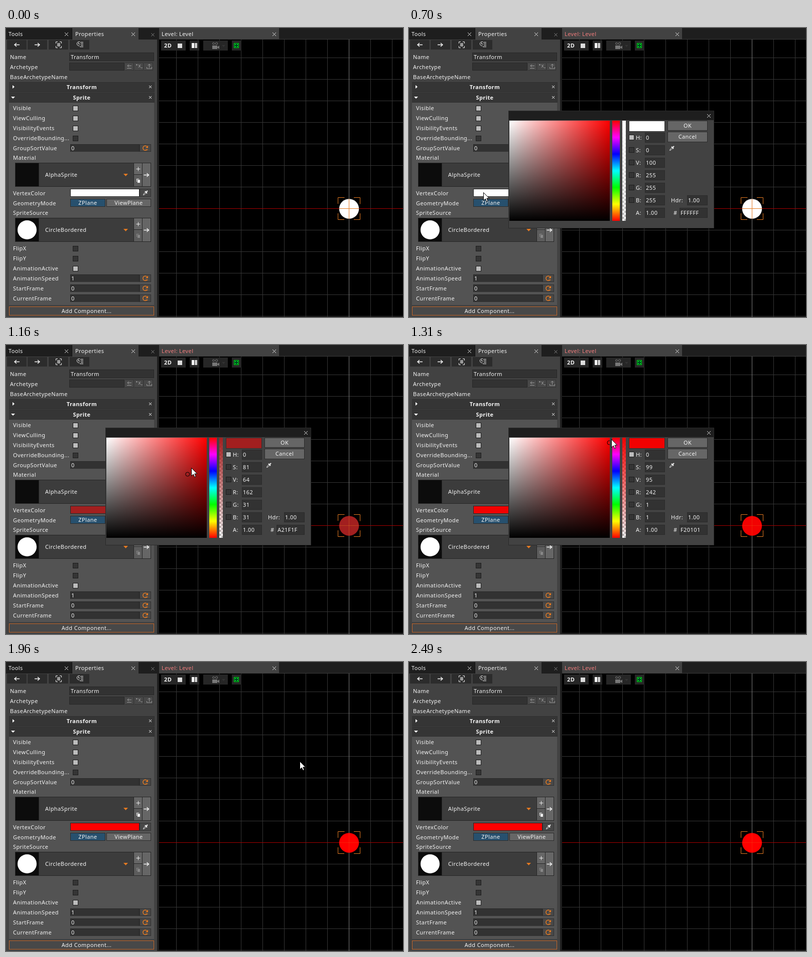
An HTML page that plays this animation: 791x577 px, repeating every 3.15 s.

```html
<!DOCTYPE html>
<html lang="en">
<head>
<meta charset="utf-8">
<title>Vertex color</title>
<style>
  html, body { margin: 0; width: 100%; height: 100%; overflow: hidden; background: #000; }
  svg { display: block; width: 791px; height: 577px; --picked: #fff; }
  rect { shape-rendering: crispEdges; }
  text { font: 11px "Noto Sans", sans-serif; letter-spacing: .4px; fill: #f4f4f4; white-space: pre; }
  .bold { font-weight: 700; }
  .mid { text-anchor: middle; }
  .line { fill: none; stroke: #eee; }
  .picked { fill: var(--picked); }
</style>
</head>
<body>
<svg id="stage" viewBox="0 0 791 577"></svg>
<script>
const LOOP = 3150, STEP = 30;
const DIALOG_OPEN = 630, PICK_START = 1070, PICK_END = 1430, DIALOG_CLOSE = 1960;
const ORANGE = '#e57a22', BUTTON = '#666', FIELD = '#323232', PANEL = '#424242', DARK = '#1e1e1e';

// Pointer keys: time, x, y
const pointerPath = [
  [100, 556, 30], [190, 428, 128], [280, 252, 256], [370, 133, 333], [430, 115, 340],
  [520, 145, 329], [560, 148, 328], [710, 148, 328], [800, 196, 318], [920, 302, 297],
  [1010, 339, 290], [1070, 347, 280], [1190, 380, 228], [1280, 400, 191], [1310, 405, 187],
  [1400, 412, 170], [1490, 421, 169], [1610, 473, 175], [1670, 556, 194], [1730, 585, 198],
  [2150, 585, 198], [2250, 618, 268], [2370, 690, 430], [2460, 743, 557]
];

// Shape helpers
const box = (x, y, w, h, fill, extra = '') =>
  `<rect x="${x}" y="${y}" width="${w}" height="${h}" fill="${fill}" ${extra}/>`;
const label = (x, y, str, cls = '', extra = '') =>
  `<text x="${x}" y="${y}" class="${cls}" ${extra}>${str}</text>`;
const shape = (d, fill) => `<path d="${d}" fill="${fill}"/>`;
const line = (d, color = '#eee', width = 1) =>
  `<path class="line" d="${d}" style="stroke:${color};stroke-width:${width}"/>`;
const cross = (x, y, r, color = '#ddd') =>
  line(`M${x - r} ${y - r}l${2 * r} ${2 * r}m0 ${-2 * r}l${-2 * r} ${2 * r}`, color);
const check = (x, y, on) =>
  box(x, y, 11, 11, '#1c1c1c') + box(x + 1, y + 1, 9, 9, on ? '#bcbcbc' : '#353535');
const button = (x, y, w, h, str, fill = BUTTON) =>
  box(x, y, w, h, '#2c2c2c') + box(x + 1, y + 1, w - 2, h - 2, fill) +
  label(x + w / 2, y + h / 2 + 3.5, str, 'mid');
const dropper = (x, y) =>
  line(`M${x - 4.5} ${y + 4.5}l1-2.5 4-4 1.5 1.5-4 4z`, '#e8e8e8') +
  line(`M${x - 1} ${y - 3}l4 4M${x + 1} ${y - 1}l3-3`, '#f4f4f4', 2);
const reset = (x, y) =>
  line(`M${x + 3.5} ${y - 3}A4.5 4.5 0 1 0 ${x + 4} ${y + 3}`, ORANGE, 1.5) +
  shape(`M${x + 6} ${y - 5}v5h-5z`, ORANGE) + line(`M${x + 1} ${y + 3.5}h5`, ORANGE);
const arrow = (x, y, dir) =>
  line(`M${x - 5 * dir} ${y}h${10 * dir}m${-4 * dir}-3.5l${4 * dir} 3.5l${-4 * dir} 3.5`, '#f4f4f4', 1.4);

function numberRow(y, name, value) {
  return label(14, y + 4, name) + box(128, y - 8, 138, 15, '#282828') +
    box(129, y - 7, 136, 14, FIELD) + label(130, y + 4, value) +
    box(266, y - 8, 23, 15, '#303030') + box(267, y - 7, 21, 13, '#484848') + reset(277, y - .5);
}

function resourceRow(y, name, copyColor) {
  return box(18, y, 271, 48, '#262626') + box(66, y + 1, 188, 46, '#3c3c3c') +
    box(19, y + 1, 46, 46, '#0c0c0c') + label(78, y + 28, name) +
    shape(`M234 ${y + 22}h9l-4.5 5z`, ORANGE) +
    box(255, y + 1, 16, 22, BUTTON) + box(255, y + 24, 16, 23, '#5c5c5c') +
    box(272, y + 1, 16, 46, BUTTON) + arrow(279.5, y + 24.5, 1) +
    line(`M259.5 ${y + 12.5}h8m-4-4v8`, '#eee') +
    box(260, y + 32, 5, 6, copyColor) + box(262, y + 34, 5, 6, copyColor) +
    line(`M261.5 ${y + 39}v-5.5h4`, '#555');
}

function header(y, name, triangle) {
  return box(6, y, 290, 20, '#303030') + box(6, y + 1, 289, 18, '#353535') +
    shape(triangle, '#fff') + label(151, y + 14, name, 'bold mid') + cross(287.5, y + 9.5, 2.5, '#fff');
}

function topBar() {
  return box(0, 0, 791, 23, DARK) + box(132, 0, 132, 23, PANEL) + box(305, 0, 239, 23, PANEL) +
    box(131, 0, 1, 23, '#111') + box(305, 22, 486, 1, '#3c3c3c') +
    label(5, 16, 'Tools') + label(138, 16, 'Properties') +
    label(310, 16, 'Level: Level', '', 'id="levelTab"') +
    cross(120.5, 12.5, 3.5) + cross(253.5, 12.5, 3.5) + cross(292.5, 13.5, 3, '#888') + cross(534.5, 12.5, 3.5);
}

function toolButtons() {
  return [2, 43, 85, 127].map(x => box(x, 24, 39, 19, '#2c2c2c')).join('') +
    arrow(22, 33.5, -1) + arrow(62, 33.5, 1) +
    line('M99.5 31v-3.5h3.500M107 27.5h3.500v3.500M110.5 36v3.500h-3.500M103 39.5h-3.500v-3.500') +
    box(102, 30, 6, 7, '#999') +
    line('M147 27.5h-2.5a4 4 0 1 0 2 8M144.5 29v3h3') +
    line('M148 28.500h6M149 31.500h5M149 34.500h5M147 37.500h7');
}

function properties() {
  const checks = [[160, 'Visible', 1], [180, 'ViewCulling', 1], [200, 'VisibilityEvents', 1],
    [220, 'OverrideBounding...', 0], [440, 'FlipX', 0], [460, 'FlipY', 0], [480, 'AnimationActive', 1]];
  const numbers = [[240, 'GroupSortValue', 0], [500, 'AnimationSpeed', 1],
    [520, 'StartFrame', 0], [540, 'CurrentFrame', 0]];
  return box(0, 23, 304, 554, PANEL) + box(301, 23, 4, 554, DARK) + toolButtons() +
    label(8, 62, 'Name') + label(8, 82, 'Archetype') + label(8, 102, 'BaseArchetypeName') +
    box(126, 49, 169, 17, '#282828') + box(127, 50, 167, 15, FIELD) + label(129, 62, 'Transform') +
    box(126, 69, 110, 16, '#282828') + box(127, 70, 108, 14, FIELD) +
    [237, 256, 275].map(x => box(x, 69, 18, 16, '#333') + box(x, 70, 17, 14, '#484848')).join('') +
    line('M250 75.500h-8m3-3l-3 3l3 3M241 80.500h9', '#999') +
    line('M259 73.500h3m-1.500-1.500v3M264 73l4 6M268 73l-4 6M269 79.500h3', '#999') +
    line('M285.500 79v-7m-3 3l3-3l3 3M280.500 78v3h10v-3', '#999') +
    box(6, 149, 289, 404, '#535353') +
    header(108, 'Transform', 'M13 114l4 3.500-4 3.500z') + header(129, 'Sprite', 'M10 137h8l-4 4z') +
    checks.map(([y, name, on]) => label(14, y + 4, name) + check(133, y - 5, on)).join('') +
    numbers.map(row => numberRow(...row)).join('') +
    label(14, 263, 'Material') + resourceRow(269, 'AlphaSprite', '#eee') +
    label(14, 334, 'VertexColor') + box(128, 321, 138, 16, '#262626') +
    box(129, 322, 136, 14, '#fff', 'class="picked"') +
    box(266, 321, 23, 16, '#333') + box(267, 322, 21, 14, '#484848') + dropper(278, 329) +
    label(14, 354, 'GeometryMode') + button(128, 341, 70, 16, 'ZPlane', '#27506e') + button(200, 341, 89, 16, 'ViewPlane') +
    label(14, 373, 'SpriteSource') + resourceRow(379, 'CircleBordered', '#888') +
    '<circle cx="42" cy="403" r="19" fill="#fff"/>' +
    box(6, 556, 289, 18, '#484848') +
    '<rect x="6.500" y="556.500" width="288" height="17" fill="none" stroke="#c4662a"/>' +
    label(160.5, 569, 'Add Component...', 'mid');
}

function viewport() {
  let out = box(304, 23, 487, 554, '#000') + box(304, 23, 1, 554, '#3a3a3a');
  for (let x = 339; x < 791; x += 43) out += box(x, 23, 1, 554, '#363636');
  for (let y = 59; y < 577; y += 43) out += box(305, y, 486, 1, '#363636');
  out += box(683, 23, 1, 554, '#7c7c7c') + box(305, 360, 486, 1, '#a80000');
  out += '<circle class="picked" cx="683.500" cy="361" r="19.700"/>' +
    `<g id="axes">${line('M683.500 341v40M664 360.500h39', ORANGE)}</g>` +
    line('M661.500 351v-12.500h13M693 338.500h12.500v13M705.500 370v12.500h-12.500M674 382.500h-12.500v-12.500', ORANGE);
  const bar = [[309, 49], [366, 19], [393, 49], [450, 19]];
  out += bar.map(([x, w]) => box(x, 25, w, 20, '#262626')).join('');
  out += label(315, 39, '2D', 'bold') + box(342, 31, 9, 9, '#ddd') +
    box(370, 30, 5, 10, '#fff') + box(376, 30, 5, 10, '#ccc') +
    box(411, 35, 10, 7, '#777') + shape('M421 38l4-3v7l-4-3z', '#777') +
    '<circle class="line" cx="413.500" cy="31" r="2" style="stroke:#777"/><circle class="line" cx="419.500" cy="31" r="2.200" style="stroke:#777"/>' +
    shape('M430 34h7l-3.500 4z', '#333') +
    '<rect x="454.500" y="30.500" width="9" height="9" fill="#032" stroke="#0d1"/>';
  for (let i = 0; i < 4; i++) out += box(456 + i % 2 * 4, 32 + (i >> 1) * 4, 2, 2, '#0f2');
  return out;
}

function dialog() {
  const hues = Array.from({length: 13}, (_, i) =>
    `<stop offset="${i / 12}" stop-color="hsl(${360 - i * 30} 100% 50%)"/>`).join('');
  const fade = (id, color, dir, from, to) => `<linearGradient id="${id}" ${dir}>
    <stop offset="0" style="stop-color:${color};stop-opacity:${from}"/>
    <stop offset="1" style="stop-color:${color};stop-opacity:${to}"/></linearGradient>`;
  const down = 'x2="0" y2="1"';
  const channels = [['H', 0], ['S', 0], ['V', 100], ['R', 255], ['G', 255], ['B', 255], ['A', '1.00']];
  const field = (x, y, w, value, id) => box(x, y, w, 20, '#2a2a2a') + box(x + 1, y + 1, w - 2, 18, FIELD) +
    label(x + 2, y + 14, value, '', `id="${id}"`);
  return `<defs><linearGradient id="hue" ${down}>${hues}</linearGradient>
    ${fade('white', '#fff', '', 1, 0)}${fade('black', '#000', down, 0, 1)}${fade('alpha', 'var(--picked)', down, 1, 0)}
    <pattern id="checker" x="425" y="185" width="8" height="8" patternUnits="userSpaceOnUse">
    ${box(0, 0, 8, 8, '#fff')}${box(0, 0, 4, 4, '#bbb')}${box(4, 4, 4, 4, '#bbb')}</pattern>
    <clipPath id="area">${box(200, 185, 200, 200, '#000')}</clipPath></defs>` +
    box(198, 165, 410, 235, '#2a2a2a') + box(199, 166, 408, 18, DARK) + box(199, 184, 408, 215, PANEL) +
    cross(597.5, 175.5, 3.5) +
    ['#f00', 'url(#white)', 'url(#black)'].map(f => box(200, 185, 200, 200, f)).join('') +
    '<g clip-path="url(#area)"><circle id="marker" class="line" r="4" style="stroke:#000"/></g>' +
    box(405, 185, 15, 200, 'url(#hue)') +
    box(425, 185, 7, 200, 'url(#checker)') + box(425, 185, 7, 200, 'url(#alpha)') +
    box(438, 185, 72, 22, '#303030') + box(439, 186, 70, 20, '#fff', 'class="picked"') +
    button(515, 185, 80, 20, 'OK') + button(515, 207, 80, 21, 'Cancel') + dropper(524, 240) +
    channels.map(([name, value], i) => (i < 6 ? check(438, 213 + i * 25, i === 0) : '') +
      label(452, 223 + i * 25, name + ':') + field(470, 209 + i * 25, 40, value, 'value' + name)).join('') +
    label(522, 348, 'Hdr:') + field(554, 334, 41, '1.00', 'valueHdr') +
    label(527, 373, '#') + field(539, 359, 56, 'FFFFFF', 'valueHex');
}

const stage = document.getElementById('stage');
stage.innerHTML = viewport() + properties() + topBar() + `<g id="dialog">${dialog()}</g>` +
  '<path id="pointer" d="M.500.500V16.500L4.200 13L6.800 18.500L9.200 17.500L6.800 12H11.700Z" fill="#fff" stroke="#000"/>';
const el = Object.fromEntries([...stage.querySelectorAll('[id]')].map(node => [node.id, node]));

function pointerAt(t) {
  const i = Math.max(1, pointerPath.findIndex(key => key[0] >= t));
  const [t0, x0, y0] = pointerPath[i - 1], [t1, x1, y1] = pointerPath[i];
  const k = (t - t0) / (t1 - t0);
  return [Math.round(x0 + (x1 - x0) * k), Math.round(y0 + (y1 - y0) * k)];
}

function colorAt(t) {
  if (t < PICK_START) return { s: 0, v: 1 };
  const [x, y] = pointerAt(Math.min(t, PICK_END) - STEP);
  const clamp = n => Math.min(1, Math.max(0, n));
  return { s: clamp((x - 200) / 199), v: clamp((385 - y) / 200) };
}

function show(node, visible) { node.style.display = visible ? '' : 'none'; }

function render(t) {
  const frame = Math.floor((t + 20) / STEP) * STEP - 20;
  const moving = t >= 100 && t < 2490;
  show(el.pointer, moving);
  if (moving) el.pointer.setAttribute('transform', `translate(${pointerAt(Math.min(2460, Math.max(100, frame)))})`);

  show(el.dialog, t >= DIALOG_OPEN && t < DIALOG_CLOSE);
  el.levelTab.style.fill = t >= DIALOG_OPEN ? '#f07c7c' : '';

  const { s, v } = colorAt(frame);
  const r = Math.round(v * 255), g = Math.round(v * (1 - s) * 255);
  const hex = [r, g, g].map(n => n.toString(16).padStart(2, '0')).join('').toUpperCase();
  const values = { S: Math.round(s * 100), V: Math.round(v * 100), R: r, G: g, B: g, Hex: hex };
  for (const name in values) el['value' + name].textContent = values[name];
  stage.style.setProperty('--picked', '#' + hex);
  el.axes.style.opacity = 1 - s * .75;
  show(el.marker, t >= PICK_START);
  el.marker.setAttribute('transform', `translate(${200 + s * 200} ${385 - v * 200})`);
}

const start = performance.now();
function tick() {
  render((performance.now() - start) % LOOP);
  requestAnimationFrame(tick);
}
tick();
</script>
</body>
</html>
```
